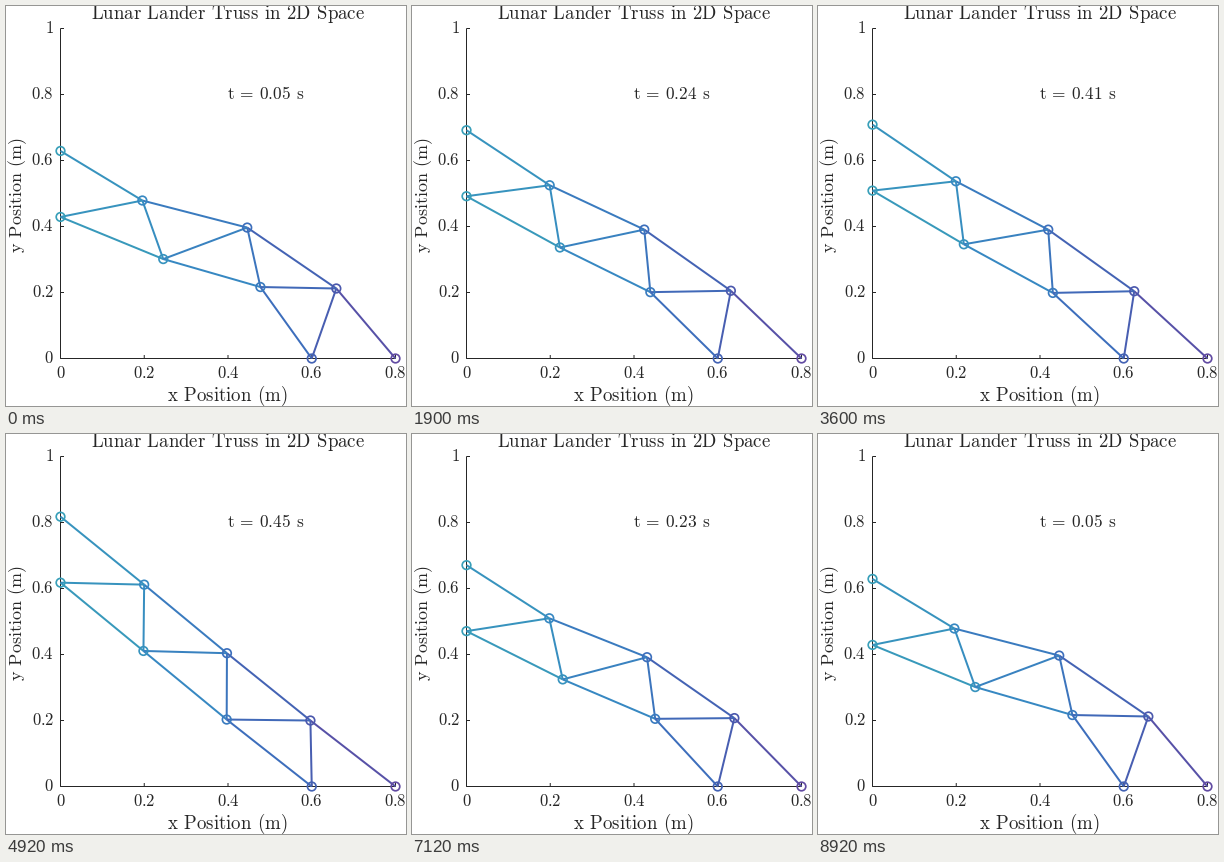
Recreate the animation shown at these times as a matplotlib script. Size 400 px wide and 400 px high, loop 9020 ms.

```python
import numpy as np
import matplotlib.pyplot as plt
from matplotlib.animation import FuncAnimation
from matplotlib.collections import LineCollection
from matplotlib.colors import LinearSegmentedColormap

plt.rcParams["mathtext.fontset"] = "cm"
plt.rcParams["mathtext.default"] = "rm"

SIZE, DPI = 400, 100
LOOP, TICK, HOLD = 9020, 20, 100       # ms
X0, Y0, SX, SY = 54, 352, 418.75, 330  # axes origin and scale in pixels
INK = "#262626"
PX = 72 / DPI

fig = plt.figure(figsize=(SIZE / DPI, SIZE / DPI), dpi=DPI, facecolor="white")
ax = fig.add_axes([0, 0, 1, 1])
ax.set_xlim(-0.5, SIZE - 0.5)
ax.set_ylim(SIZE - 0.5, -0.5)
ax.axis("off")


def tex(s):
    return "$" + s.replace(" ", r"\hspace{0.4}") + "$"


def label(x, y, s, px, ha="center", **kw):
    return ax.text(x, y, s, fontsize=px * PX, color=INK, ha=ha,
                   va="baseline", **kw)


def rule(xs, ys):
    ax.plot(xs, ys, color=INK, lw=PX, solid_capstyle="butt", snap=False)


# Axes
rule([X0, X0 + 0.8 * SX], [Y0, Y0])
rule([X0, X0], [Y0, Y0 - SY])
for i in range(6):
    name = tex(f"{i / 5:g}")
    y = Y0 - SY * i / 5
    rule([X0, X0 + 3.5], [y, y])
    label(47.5, y + 4.7, name, 16.7, ha="right")
    if i < 5:
        x = X0 + SX * i / 5
        rule([x, x], [Y0, Y0 - 3.5])
        label(x, 372, name, 16.7)

label(221.7, 12.7, tex("Lunar Lander Truss in 2D Space"), 18.8)
label(221.2, 394, tex("x Position (m)"), 18.8)
label(16, 188.5, tex("y Position (m)"), 18, rotation=90,
      rotation_mode="anchor")
clock = label(220.3, 92.7, "", 17.3, ha="left")

# Joints zigzag between the upper and lower chord, from wall to ground
index = np.arange(9)
low = index % 2
x = index // 2 / 5
REST = np.column_stack([X0 + SX * x, Y0 - SY * (0.8 - x - 0.2 * low)])
BARS = ([(i, i + 2) for i in range(7)]
        + [(i, i + 1) for i in range(1, 7)])

# Joint shift per unit swing and per unit swing squared (x + y j)
LIN = np.array([50j, 50j, 0.6 + 33.3j, 7.8 + 30.3j, 9.8 + 10.1j,
                12.9 + 7j, 12.4 - 0.5j, 0, 0])
QUAD = np.array([0, 0, -2 + 1.9j, 8 - 1.3j, 6.4 - 8.1j,
                 14 - 10.5j, 8.3 - 2.7j, 0, 0])

dense = LinearSegmentedColormap.from_list(
    "dense", ["#389fb9", "#3788c2", "#3d6fbc", "#4b58ad", "#624ba2"])
tone = np.clip(x / 0.8 - 0.12 * low, 0, 1)

bars = LineCollection([], colors=dense([tone[list(b)].mean() for b in BARS]),
                      linewidths=2 * PX, zorder=3, snap=False)
ax.add_collection(bars)
joints = ax.scatter(*REST.T, s=(8.6 * PX) ** 2, facecolors="none",
                    edgecolors=dense(tone), linewidths=1.7 * PX,
                    zorder=4, snap=False)


def swing(t):
    """Damped oscillation with a slight wobble, softer on the way down."""
    s = t - 0.05
    amp = 53.2 * np.exp(-1.39 * s)
    phase = 1.83 + 35.4 * s - 0.13 * np.sin(15.5 * s)
    sag = (amp * np.sin(phase)
           + 0.005 * amp ** 2 * (0.5 + np.cos(2 * phase) / 6))
    return sag / 50


def pose(t):
    u = swing(t)
    shift = LIN * u + QUAD * u * u
    return REST + np.column_stack([shift.real, shift.imag])


def update(n):
    ms = n * TICK
    step = min(ms, LOOP - 1 - ms) // HOLD   # forward, then back
    t = 0.05 + 0.01 * step
    pts = pose(t)
    bars.set_segments([pts[list(b)] for b in BARS])
    joints.set_offsets(pts)
    clock.set_text(r"$t\hspace{0.2}=\hspace{0.2}%.2f\hspace{0.4}s$" % t)
    return bars, joints, clock


anim = FuncAnimation(fig, update, frames=LOOP // TICK, interval=TICK,
                     repeat=True, repeat_delay=0)
plt.show()
```
